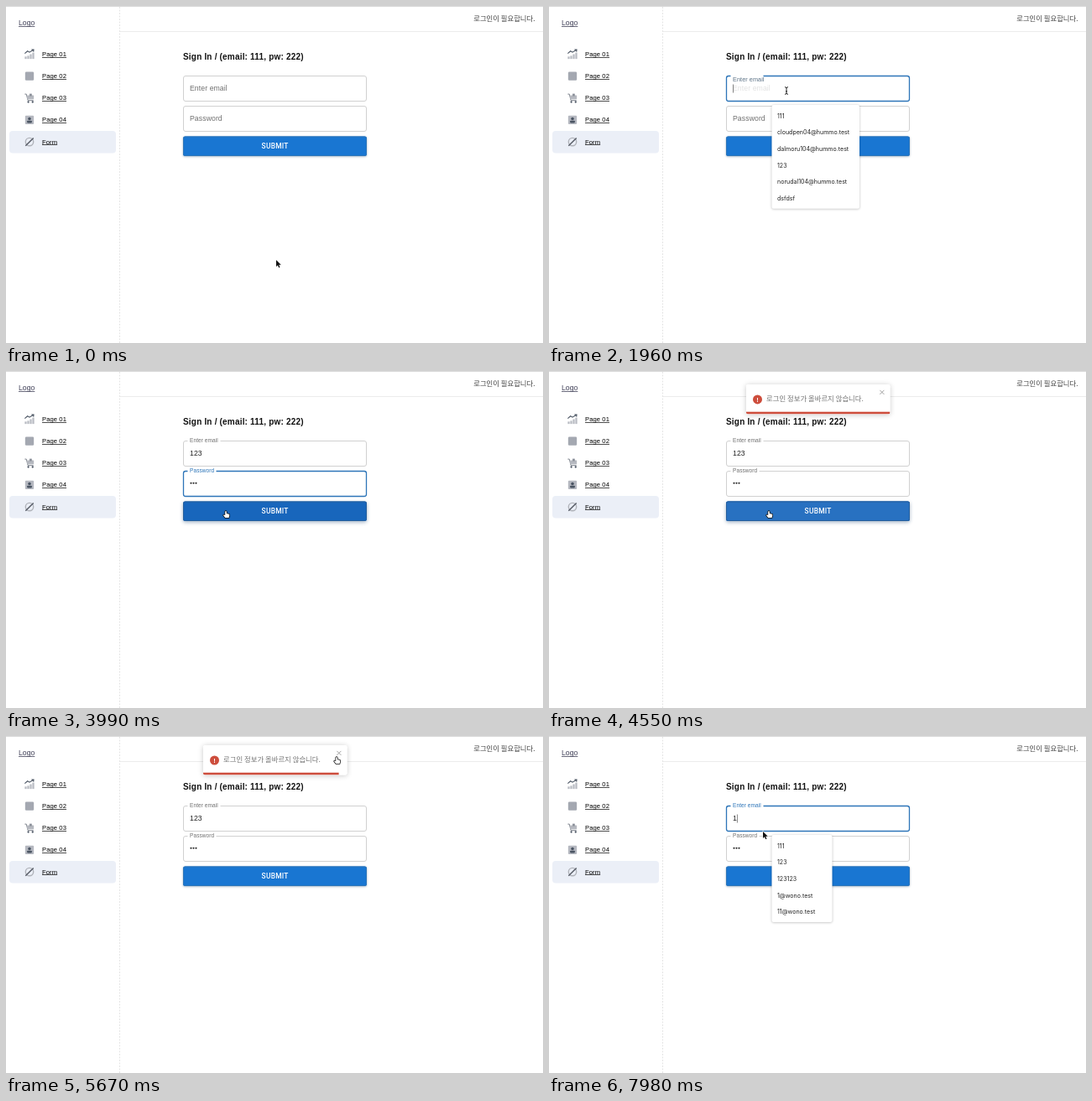
Recreate the animation shown at these times as an HTML page with a canvas. Size 640 by 402 pixels, loop 8 s.

```html
<!DOCTYPE html>
<html lang="ko">
<head>
<meta charset="utf-8">
<title>Sign In</title>
<style>
  html, body { margin: 0; width: 100%; height: 100%; overflow: hidden; background: #fff; }
  canvas { display: block; width: 100vw; height: 100vh; }
</style>
</head>
<body>
<canvas></canvas>
<script>
const W = 640, H = 402, LOOP = 8000;
const canvas = document.querySelector('canvas');
const ctx = canvas.getContext('2d');
const SANS = '"Liberation Sans", Arial, sans-serif';
const KOREAN = '"Noto Sans CJK KR", "Noto Sans CJK", sans-serif';
const UI = 'Inter, sans-serif';
const BLUE = [25, 118, 210], BLUE_DARK = [24, 102, 188], GREY = [112, 112, 112];
const EDGE = [45, 117, 184], EDGE_DARK = [36, 94, 156];

// Timeline, in ms
const EMAIL_FOCUS = 1900, PASSWORD_FOCUS = 2900, SUBMIT = 4100, TOAST_IN = 4112;
const TOAST_HOVER = 5100, TOAST_OUT = 5950, REFOCUS = 7300;
const emailKeys = [[0, ''], [2170, '1'], [2310, '12'], [2450, '123'], [7770, '12'], [7840, '1']];
const passwordKeys = [[0, 0], [3150, 1], [3290, 2], [3430, 3]];
const allItems = ['111', 'cloudpen04@hummo.test', 'dalmoru104@hummo.test', '123', 'norudal104@hummo.test', 'dsfdsf'];
const oneItems = ['111', '123', '123123', '1@wono.test', '11@wono.test'];
const twoItems = ['123', '123123'];
const suggestions = [[0, null], [EMAIL_FOCUS, allItems], [2170, oneItems], [2310, twoItems],
  [PASSWORD_FOCUS, null], [REFOCUS, twoItems], [7840, oneItems]];
const pointerPath = [[0, 322, 303], [280, 322, 303], [800, 300, 165], [1000, 298, 160], [1500, 283, 101],
  [2480, 283, 101], [2830, 238, 136], [3500, 238, 136], [3900, 262, 167], [4780, 262, 167],
  [5100, 350, 46], [5450, 394, 25], [6050, 394, 25], [6700, 310, 82], [6790, 308, 84],
  [6930, 298.5, 94.5], [7300, 298.5, 94.5], [7600, 255, 114], [LOOP, 255, 114]];

const clamp = v => Math.min(1, Math.max(0, v));
const lerp = (a, b, p) => a + (b - a) * p;
const mix = (a, b, p) => `rgb(${a.map((v, i) => Math.round(lerp(v, b[i], p)))})`;
const smooth = p => p * p * (3 - 2 * p);
const outCubic = p => 1 - (1 - p) ** 3;
const latest = (steps, t) => steps.findLast(s => s[0] <= t);
// Rises at `on`, falls at `off`, each over `ms`
const pulse = (t, on, off, ms) => clamp((t - on) / ms) * (1 - clamp((t - off) / ms));

function bezier(x1, y1, x2, y2) {
  const curve = (a, b, s) => 3 * (1 - s) ** 2 * s * a + 3 * (1 - s) * s * s * b + s ** 3;
  return p => {
    let lo = 0, hi = 1;
    for (let i = 0; i < 24; i++) {
      const mid = (lo + hi) / 2;
      if (curve(x1, x2, mid) < p) lo = mid; else hi = mid;
    }
    return curve(y1, y2, lo);
  };
}
const ease = bezier(.25, .1, .25, 1), decelerate = bezier(0, 0, .2, 1);

// Interpolates [time, value...] keyframes, easing each segment
function track(keys, t, easing) {
  const i = Math.max(1, keys.findIndex(k => k[0] > t)), a = keys[i - 1], b = keys[i];
  const p = easing(clamp((t - a[0]) / (b[0] - a[0])));
  return a.slice(1).map((v, j) => lerp(v, b[j + 1], p));
}

function text(str, x, y, size, color, { font = SANS, weight = 400, align = 'left', spacing = 0 } = {}) {
  ctx.font = `${weight} ${size}px ${font}`;
  ctx.letterSpacing = spacing + 'px';
  ctx.textAlign = align;
  ctx.fillStyle = color;
  ctx.fillText(str, x, y);
  return ctx.measureText(str).width;
}

function rect(x, y, w, h, color) {
  ctx.fillStyle = color;
  ctx.fillRect(x, y, w, h);
}

function round(x, y, w, h, r, fill, stroke, width = 1) {
  ctx.beginPath();
  ctx.roundRect(x, y, w, h, r);
  if (fill) { ctx.fillStyle = fill; ctx.fill(); }
  if (stroke) { ctx.strokeStyle = stroke; ctx.lineWidth = width; ctx.stroke(); }
}

function circle(x, y, r, fill) {
  ctx.beginPath();
  ctx.arc(x, y, r, 0, 7);
  ctx.fillStyle = fill;
  ctx.fill();
}

function line(d, color, width) {
  ctx.strokeStyle = color;
  ctx.lineWidth = width;
  ctx.stroke(new Path2D(d));
}

function withShadow(color, blur, dy, draw) {
  ctx.save();
  ctx.shadowColor = color;
  ctx.shadowBlur = blur * canvas.width / W;
  ctx.shadowOffsetY = dy * canvas.height / H;
  draw();
  ctx.restore();
}

// Icons are drawn around their centre
const icons = [
  () => {
    [3, 4, 6, 8].forEach((h, i) => rect(-6 + i * 3.2, 6 - h, 2.4, h, '#b9bcc3'));
    line('M-6 -1L-2.5 -4L0 -2.5L5 -5.5M2.5 -5.8L5.3 -5.8L5 -3', '#4b5563', 1.2);
  },
  () => round(-5.5, -5.5, 11, 11, 1.5, '#a4a8b1'),
  () => {
    line('M-6 -5L-4 -5L-2 3L5 3', '#777c87', 1);
    round(-3, -3.5, 8.5, 5, .5, '#b5b8bf');
    rect(0, -5.5, 3, 3, '#8d929b');
    circle(-1.5, 5, 1.2, '#4b5563');
    circle(4, 5, 1.2, '#4b5563');
  },
  () => {
    round(-5.5, -5.5, 11, 11, 1.2, '#b5b8c0');
    circle(0, -1.5, 1.9, '#4b5563');
    round(-3.2, .9, 6.4, 2.8, 1.2, '#4b5563');
  },
  () => {
    ctx.beginPath();
    ctx.arc(0, 0, 5, 0, 7);
    ctx.strokeStyle = '#b0b3ba';
    ctx.lineWidth = 1.5;
    ctx.stroke();
    line('M-5 5L5 -5', '#555a64', 1.5);
  }
];

function drawFrame() {
  rect(0, 0, W, H, '#fff');
  rect(0, 0, W, 1, '#d9d9d9');
  rect(136, 30, W - 136, 1, '#ececec');
  ctx.setLineDash([2, 1.5]);
  line('M135.5 1V402', '#e4e4e4', 1);
  ctx.setLineDash([]);

  rect(15, 24, text('Logo', 15, 23, 8.7, '#45455c'), .8, '#45455c');
  round(4, 149, 127, 26.5, 4, '#ebeff7');
  ['Page 01', 'Page 02', 'Page 03', 'Page 04', 'Form'].forEach((name, i) => {
    const y = 57.5 + i * 26.15;
    ctx.save();
    ctx.translate(28, y);
    ctx.scale(.94, .94);
    icons[i]();
    ctx.restore();
    rect(43, Math.round(y + 3.3), text(name, 43, y + 2.4, 7.65, '#000', { spacing: .08 }), .8, '#222');
  });
  text('로그인이 필요합니다.', 630.5, 18, 8.35, '#444', { font: KOREAN, align: 'right' });
  text('Sign In / (email: 111, pw: 222)', 211, 63.5, 10, '#111', { weight: 700, spacing: .19 });
}

function drawField(t, top, label, focusedAt, focus, focused, hovered, filled) {
  const base = top + 17.7, since = t - focusedAt;
  const shrink = decelerate(clamp(since / 200));
  const border = focused ? mix(EDGE, EDGE, 0) : hovered ? '#777' : '#d0d0d0';
  round(211.5, top + .5, 218, 30, 2.5, '#fff', border, focused ? 1.3 : 1);
  const size = lerp(8.7, 6.55, shrink);
  if (since > 50) rect(216.5, top - 1, label === 'Password' ? 34 : 39, 3, '#fff');
  if (since > 0 && !filled) {
    ctx.globalAlpha = .42 * clamp(since / 200);
    text(label, 219, base, 8.7, '#222', { spacing: .08 });
    ctx.globalAlpha = 1;
  }
  text(label, 219, lerp(base, top + 2, shrink), size, mix(GREY, EDGE, focus), { spacing: size * .009 });
}

function drawCaret(t, x, y, lastAction) {
  if ((t - lastAction) % 1000 < 500) rect(x, y, .9, 10, '#777');
}

function drawForm(t, px, py) {
  const emailFocused = t >= EMAIL_FOCUS && t < PASSWORD_FOCUS || t >= REFOCUS;
  const passwordFocused = t >= PASSWORD_FOCUS && t < SUBMIT;
  const [emailTime, email] = latest(emailKeys, t);
  const [dotTime, dots] = latest(passwordKeys, t);
  const over = top => px > 211 && px < 430 && py > top + 2 && py < top + 30;

  const emailGlow = pulse(t, EMAIL_FOCUS, PASSWORD_FOCUS, 200) + clamp((t - REFOCUS) / 200);
  drawField(t, 83, 'Enter email', EMAIL_FOCUS, emailGlow, emailFocused, over(83), email);
  const width = text(email, 219, 101, 8.7, '#222', { spacing: .08 });
  if (emailFocused) {
    drawCaret(t, 219 + width, 93.5, Math.max(emailTime, t >= REFOCUS ? REFOCUS : EMAIL_FOCUS));
  }

  const passwordGlow = pulse(t, PASSWORD_FOCUS, SUBMIT, 200);
  drawField(t, 119, 'Password', PASSWORD_FOCUS, passwordGlow, passwordFocused, over(119), dots);
  for (let i = 0; i < dots; i++) circle(220.5 + i * 3, 133.7, 1.05, '#222');
  if (passwordFocused) drawCaret(t, 219 + dots * 3.1, 130, Math.max(dotTime, PASSWORD_FOCUS));
}

function drawButton(t) {
  const hover = pulse(t, 700, 1085, 250) + pulse(t, 3735, 4840, 250);
  const shape = () => round(211, 155.5, 219, 23.5, 2.3, mix(BLUE, BLUE_DARK, hover));
  withShadow('rgba(40,80,125,.45)', lerp(2.5, 4.5, hover), lerp(.8, 1.4, hover), shape);
  const age = t - SUBMIT;
  if (age > 0 && age < 650) {
    ctx.save();
    shape();
    ctx.clip();
    circle(262, 167, 190 * smooth(clamp(age / 550)), `rgba(255,255,255,${.2 * (1 - clamp((age - 100) / 550))})`);
    ctx.restore();
  }
  round(211.5, 156, 218, 22.5, 2, null, mix(EDGE, EDGE_DARK, hover));
  text('SUBMIT', 320.6, 170, 8.4, '#fff', { font: 'Roboto, sans-serif', weight: 500, align: 'center', spacing: .25 });
}

function drawSuggestions(t) {
  const items = latest(suggestions, t)[1];
  if (!items) return;
  const w = items === allItems ? 104.5 : 72;
  withShadow('rgba(0,0,0,.28)', 3, .6, () => round(265.5, 118, w, 5.5 + items.length * 19.7, 2, '#fff'));
  items.forEach((item, i) => text(item, 272, 133.8 + i * 19.65, 7.05, '#222', { font: UI }));
}

function drawToast(t) {
  if (t < TOAST_IN || t > TOAST_OUT + 700) return;
  const leaving = t >= TOAST_OUT;
  const [dy, alpha] = leaving
    ? track([[0, 0, 1], [140, -5.4, 1], [280, 10.8, 1], [315, 10.8, 1], [700, -1080, 0]], t - TOAST_OUT, ease)
    : track([[0, -1620, 0], [420, 13.5, 1], [525, -5.4, 1], [630, 2.7, 1], [700, 0, 1], [LOOP, 0, 1]], t - TOAST_IN, outCubic);
  const remaining = 1 - clamp((Math.min(t, TOAST_HOVER) - TOAST_IN - 700) / 5000);
  const red = '#cd4d3c';
  ctx.save();
  ctx.globalAlpha = alpha;
  ctx.translate(0, dy);
  const body = () => round(235, 11, 171.5, 35.5, 2.2, '#fff');
  withShadow('rgba(0,0,0,.22)', 6, .7, body);
  body();
  ctx.clip();
  rect(235, 43.7, 171.5 * remaining, 2.8, red);
  circle(248.5, 29, 5.5, red);
  text('!', 248.5, 31.7, 7.5, '#fff', { weight: 700, align: 'center' });
  text('로그인 정보가 올바르지 않습니다.', 259, 31.2, 8.4, '#757575', { font: KOREAN });
  line('M394.4 17.9L399.4 22.9M399.4 17.9L394.4 22.9', '#a0a0a0', 1);
  ctx.restore();
}

function outlined(d) {
  const path = new Path2D(d);
  return (fill, stroke, width) => {
    ctx.lineJoin = 'round';
    ctx.strokeStyle = stroke;
    ctx.lineWidth = width;
    ctx.stroke(path);
    ctx.fillStyle = fill;
    ctx.fill(path);
  };
}
const arrow = outlined('M0 0V8L1.9 6.3L3.2 9.2L4.5 8.6L3.2 5.8H5.8Z');
const hand = outlined('M-.8 .7Q0 -.5 .8 .7V3L3.7 3.7Q4.5 4 4.3 5L3.6 8H-.7L-2.9 5.2Q-2.6 4.1 -.8 5Z');

function drawPointer(t, x, y) {
  const inForm = x > 211 && x < 430;
  const onButton = inForm && y > 155.5 && y < 179;
  const onToast = t > 4400 && t < 6280 && y < 47;
  const onField = inForm && (y > 83 && y < 114 || y > 119 && y < 150);
  ctx.save();
  ctx.translate(x, y);
  if (onButton || onToast) hand('#fff', '#111', 1.5);
  else if (onField) {
    const beam = 'M-2 -4.3Q0 -4.3 0 -3V3Q0 4.3 -2 4.3M2 -4.3Q0 -4.3 0 -3M0 3Q0 4.3 2 4.3M-1 .9H1';
    line(beam, 'rgba(255,255,255,.8)', 2);
    line(beam, '#111', .9);
  } else arrow('#111', '#fff', 1.4);
  ctx.restore();
}

function render(now) {
  const ratio = devicePixelRatio || 1;
  const w = Math.round(innerWidth * ratio), h = Math.round(innerHeight * ratio);
  if (canvas.width !== w || canvas.height !== h) { canvas.width = w; canvas.height = h; }
  ctx.setTransform(w / W, 0, 0, h / H, 0, 0);

  const t = now % LOOP;
  const [x, y] = track(pointerPath, t, smooth);
  drawFrame();
  drawForm(t, x, y);
  drawButton(t);
  drawSuggestions(t);
  drawToast(t);
  drawPointer(t, x, y);
  requestAnimationFrame(render);
}
requestAnimationFrame(render);
</script>
</body>
</html>
```
